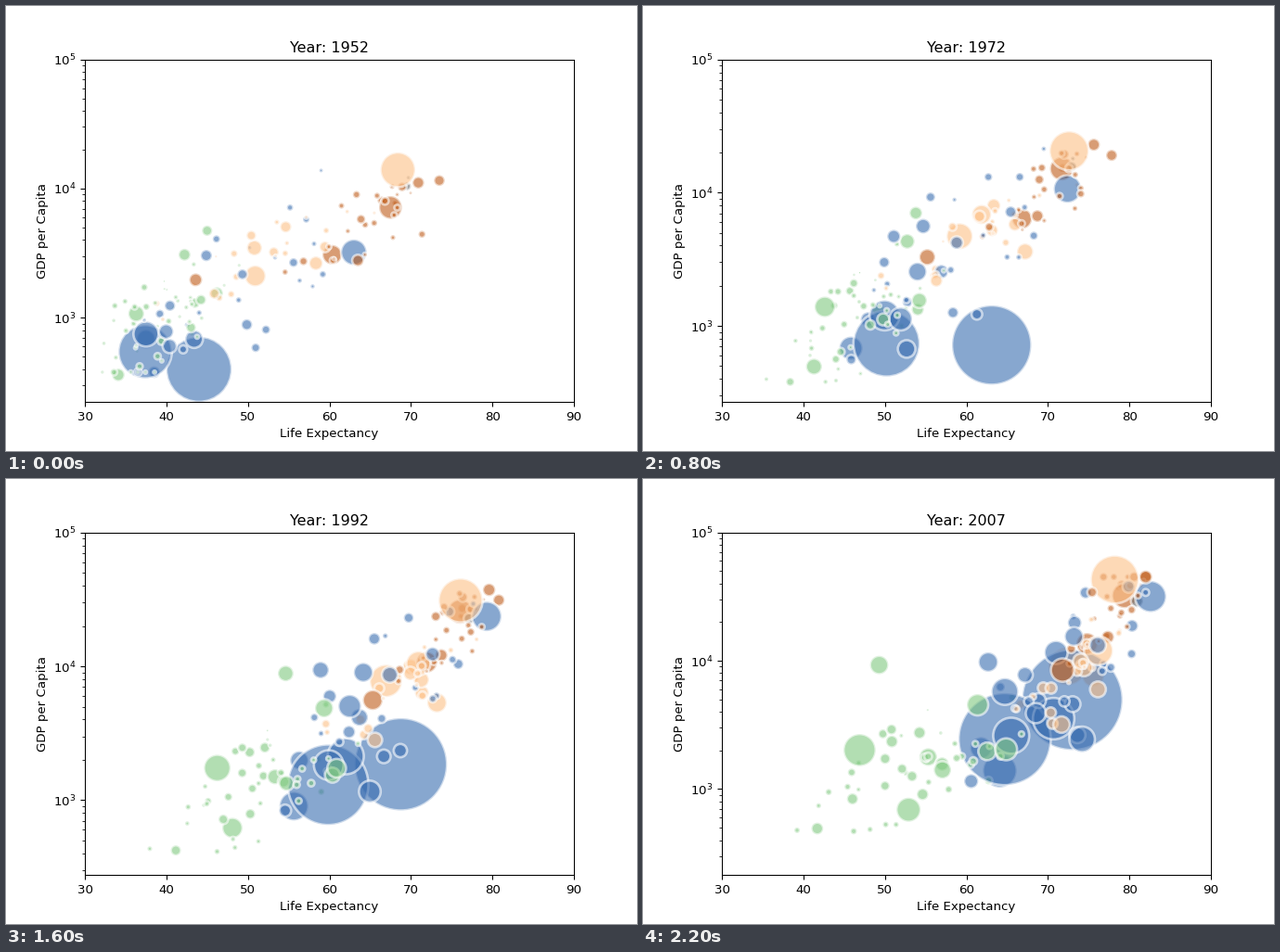
Recreate the animation shown at these times as a matplotlib script. Size 680 px wide and 480 px high, loop 2400 ms.

```python
import numpy as np
import matplotlib.pyplot as plt
from matplotlib.animation import FuncAnimation

YEARS = np.arange(1952, 2008, 5)
STEPS = np.arange(len(YEARS))
# Lower GDP limit of the axis in each year
FLOOR = [223, 251, 269, 266, 268, 288, 341, 309, 276, 245, 186, 214]

AFRICA, AMERICAS, ASIA, EUROPE, OCEANIA = range(5)

# Steps at which a path with so many key points passes through them
KEYS = {2: (0, 11), 3: (0, 6, 11), 5: (0, 1, 2, 4, 11)}

# Key points of population (millions), life expectancy and GDP per capita
MAJOR = [
    ("Bangladesh", ASIA, (47, 150), (37.5, 50, 64.1), (684, 677, 1391)),
    ("Brazil", AMERICAS, (57, 190), (50.9, 63.3, 72.4), (2109, 7031, 9066)),
    ("China", ASIA, (556, 1000, 1319), (44, 50.5, 44.5, 63.1, 73),
     (400, 962, 4959)),
    ("Ethiopia", AFRICA, (21, 76), (34.1, 44.9, 52.9), (362, 578, 691)),
    ("Germany", EUROPE, (69, 82), (67.5, 73.8, 79.4), (7144, 22032, 32170)),
    ("India", ASIA, (372, 708, 1110), (37.4, 56.6, 64.7), (547, 856, 2452)),
    ("Indonesia", ASIA, (82, 224), (37.5, 56.2, 70.7), (750, 1517, 3541)),
    ("Iran", ASIA, (17, 70), (44.9, 59.6, 71), (3035, 7608, 11606)),
    ("Japan", ASIA, (86, 127), (63, 77.1, 82.6), (3217, 19384, 31656)),
    ("Mexico", AMERICAS, (30, 109), (50.8, 67.4, 76.2), (3478, 9611, 11978)),
    ("Nigeria", AFRICA, (33, 135), (36.3, 45.8, 46.9), (1077, 1577, 2014)),
    ("Pakistan", ASIA, (41, 169), (43.4, 56.2, 65.5), (685, 1444, 2606)),
    ("South Africa", AFRICA, (14, 44), (45, 58.2, 49.3), (4725, 8568, 9270)),
    ("Turkey", EUROPE, (22, 71), (43.6, 61, 71.8), (1969, 4241, 8458)),
    ("United States", AMERICAS, (158, 301), (68.4, 74.7, 78.2),
     (13990, 25010, 42952)),
    ("Vietnam", ASIA, (26, 85), (40.4, 58.8, 74.2), (605, 707, 2442)),
]

rng = np.random.default_rng(12)


def path(points):
    return np.interp(STEPS, KEYS[len(points)], points)


def log_path(points):
    return np.exp(path(np.log(points)))


def track(name, code, pop, life, gdp):
    return name, code, log_path(pop), path(life), log_path(gdp)


def scattered(code, count, pop, growth, life, life_sd, gdp, gdp_sd):
    """Seeded countries that follow the trend of their continent."""
    sd = np.linspace(*life_sd, 3)
    for _ in range(count):
        wealth = np.clip(rng.normal(), -1.8, 1.8)
        health = 0.75 * wealth + 0.6 * np.clip(rng.normal(), -1.5, 1.5)
        drift = 0.25 * rng.normal(size=(2, 3))
        start = min(pop * np.exp(0.95 * rng.normal()), 50)
        lives = np.minimum(life + sd * (health + drift[0]), 82)
        gdps = np.clip(gdp * np.exp(gdp_sd * (wealth + drift[1])), 380, 45000)
        name = chr(rng.integers(ord("A"), ord("Z") + 1))
        yield track(name, code, (start, start * growth), lives, gdps)


tracks = [
    *(track(*row) for row in MAJOR),
    *scattered(AFRICA, 49, 2.7, 3.2, np.array([39.5, 51.5, 54.5]), (4.5, 8),
               np.array([950, 1300, 1500]), 0.75),
    *scattered(AMERICAS, 22, 3.2, 2.6, np.array([53, 66.5, 73.5]), (8, 3.5),
               np.array([3100, 6000, 7700]), 0.5),
    *scattered(ASIA, 25, 4.2, 3.4, np.array([47.5, 63, 71.5]), (9, 6.5),
               np.array([1700, 5200, 8500]), 1),
    *scattered(EUROPE, 28, 7.5, 1.2, np.array([65, 73, 77.7]), (4, 2.6),
               np.array([5100, 13500, 24000]), 0.45),
    *scattered(OCEANIA, 2, 4, 2.2, np.array([69.3, 74.3, 80.7]), (0.3, 0.5),
               np.array([10300, 18500, 29500]), 0.1),
]
tracks.sort(key=lambda t: t[0])
_, codes, pops, lives, gdps = map(np.array, zip(*tracks))

fig, ax = plt.subplots(figsize=(680 / 96, 480 / 96), dpi=96)


def draw(i):
    ax.clear()
    ax.scatter(lives[:, i], gdps[:, i], s=pops[:, i] * 5, c=codes,
               cmap="Accent", vmin=0, vmax=4, alpha=0.6,
               edgecolors="white", linewidths=2)
    ax.set_yscale("log")
    ax.set_xlim(30, 90)
    ax.set_ylim(FLOOR[i], 100000)
    ax.set_xlabel("Life Expectancy")
    ax.set_ylabel("GDP per Capita")
    ax.set_title(f"Year: {YEARS[i]}")
    return []


anim = FuncAnimation(fig, draw, frames=len(YEARS), interval=200,
                     repeat=True, repeat_delay=0)
plt.show()
```
